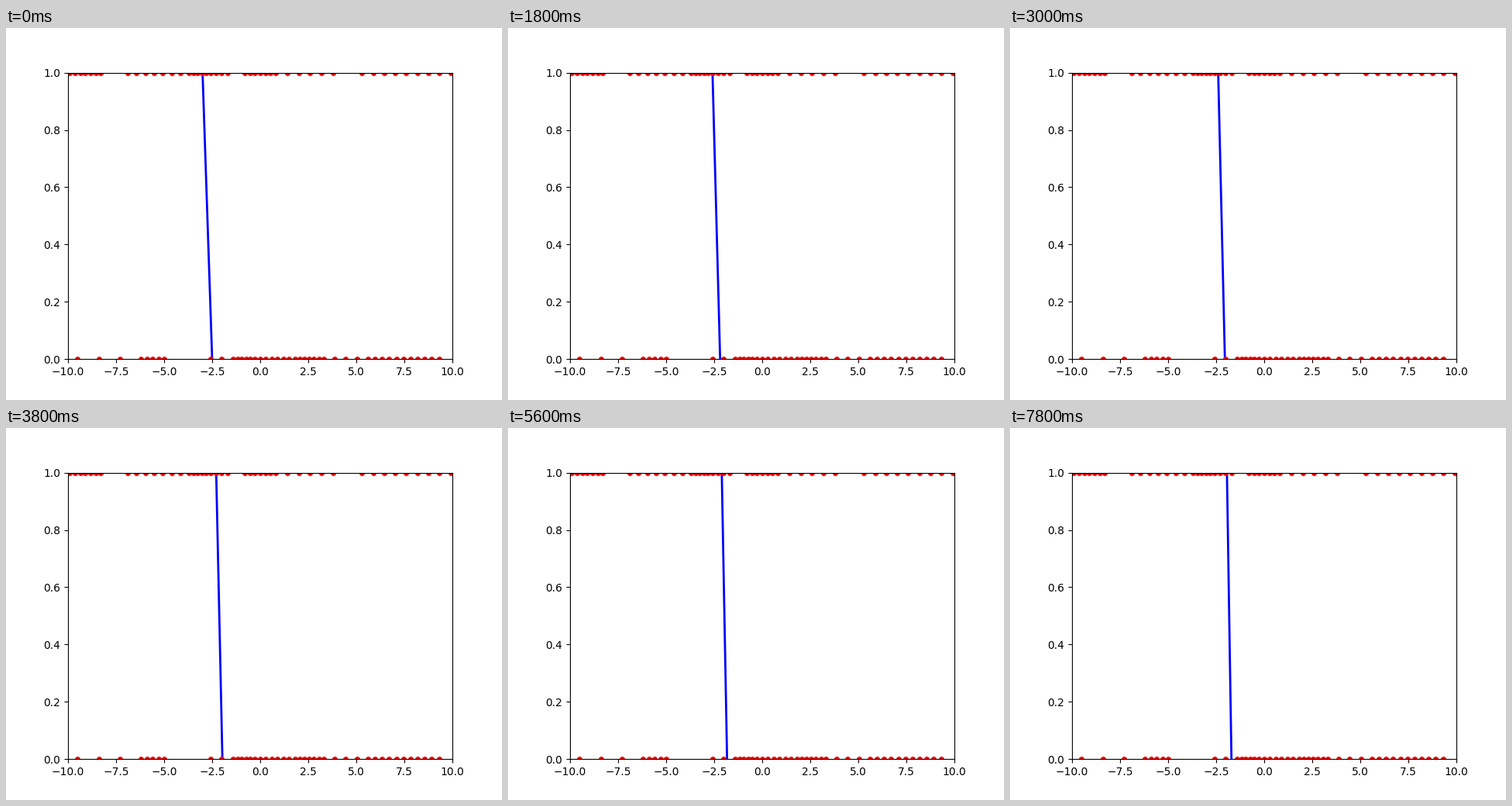
Animation of 640 by 480 pixels, one loop 8000 ms. Source, as a matplotlib script:

```python
import numpy as np
import matplotlib.pyplot as plt
from matplotlib.animation import FuncAnimation

FRAMES = 40
INTERVAL = 200
RATE = 0.058


def spread(ranks, values):
    """Sorted sample positions, interpolated between a few key ranks."""
    return np.interp(np.arange(ranks[-1] + 1), ranks, values)


ones = spread([0, 6, 7, 14, 19, 22, 23, 29, 34, 35, 43],
              [-9.9, -8.3, -6.9, -3.7, -2.6, -1.7, -0.8, 0.8, 3.8, 5.3, 9.9])
zeros = spread([0, 3, 7, 8, 10, 15, 22, 28, 32, 42],
               [-9.5, -6.2, -5.0, -2.6, -1.4, -0.3, 1.8, 3.3, 5.6, 9.3])

fig, ax = plt.subplots(figsize=(6.4, 4.8), dpi=100)
ax.set_xlim(-10, 10)
ax.set_ylim(0, 1)

xs = np.array([-10.0, 10.0])
line, = ax.plot([], [], "b-", lw=2)
for level, samples in enumerate((zeros, ones)):
    ax.plot(samples, np.full(len(samples), level), "ro", ms=4)


def draw(n):
    """Weight and bias both fall by the same step each frame."""
    drop = RATE * n
    line.set_data(xs, (-2 - drop) * xs - 5 - drop)
    return line,


anim = FuncAnimation(fig, draw, frames=FRAMES, init_func=lambda: draw(0),
                     interval=INTERVAL, repeat=True, repeat_delay=0)
plt.show()
```
